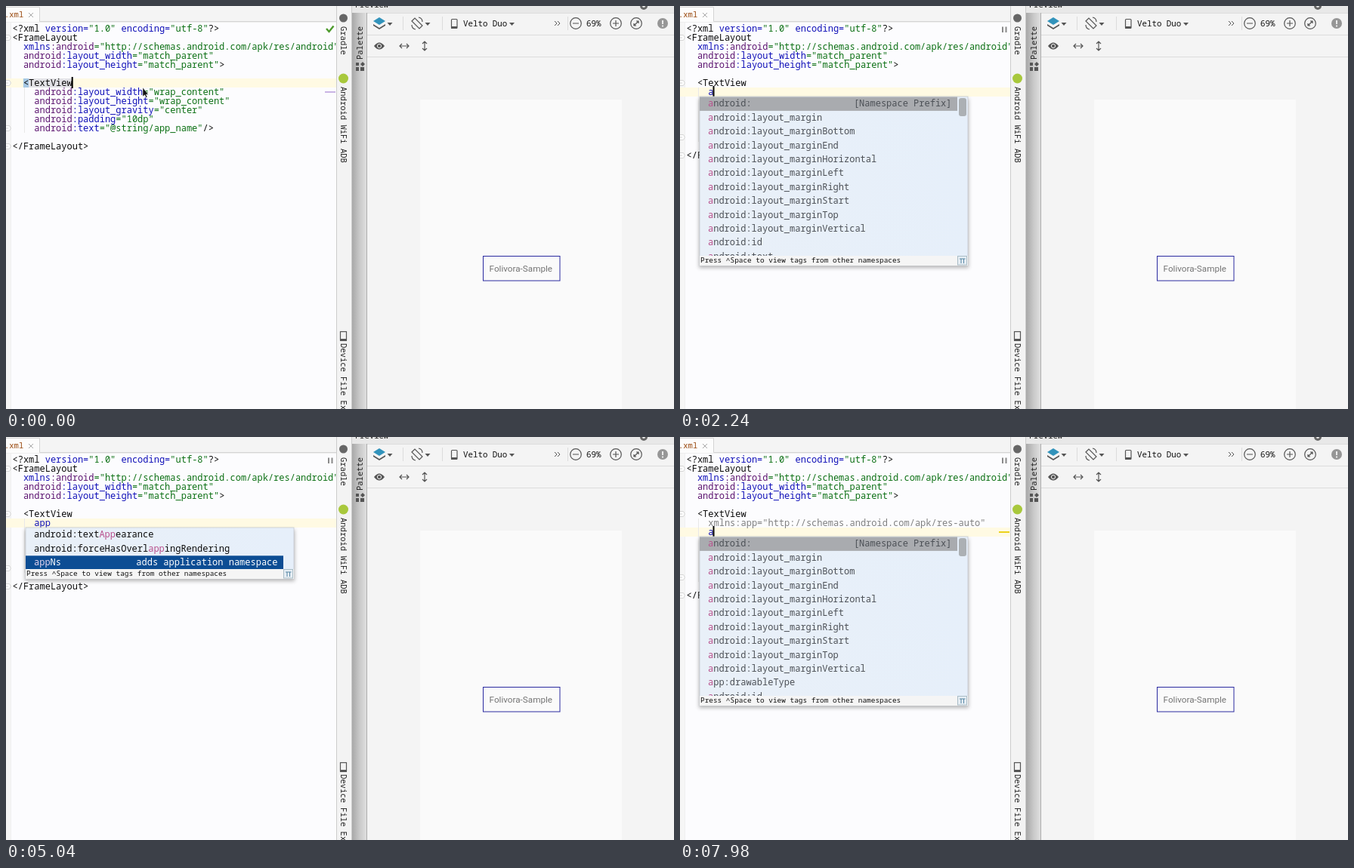
Write an HTML page that moves like this. It is 884 px wide and 534 px high and loops after 8000 ms.

```html
<!DOCTYPE html>
<html lang="en">
<head>
<meta charset="utf-8">
<title>Layout editor completion</title>
<style>
html, body { margin: 0; width: 100%; height: 100%; overflow: hidden; background: #fcfcfe; }
svg { display: block; width: 884px; height: 534px; }
text { white-space: pre; font: 500 12px "Noto Sans Mono", "DejaVu Sans Mono", monospace; }
.side { font-size: 10.5px; fill: #222; }
.tool { font-size: 10.8px; fill: #111; }
.foot { font-size: 9.42px; fill: #111; }
.line { fill: none; stroke: #555; stroke-width: 1.2; }
.rule { stroke: #dcdcdc; }
</style>
</head>
<body>
<svg viewBox="0 0 884 534" xmlns="http://www.w3.org/2000/svg">
  <defs>
    <linearGradient id="edge"><stop stop-color="#a8a8a8"/><stop offset=".5" stop-color="#c9c9c9"/><stop offset="1" stop-color="#e2e2e2"/></linearGradient>
    <linearGradient id="pop"><stop stop-color="#e9f0f8"/><stop offset="1" stop-color="#e6effa"/></linearGradient>
    <clipPath id="editClip"><path d="M0 0H437V534H0z"/></clipPath>
    <clipPath id="listClip"><rect id="listBox" x="26" width="355"/></clipPath>
    <filter id="blur" x="-10%" y="-10%" width="120%" height="125%"><feGaussianBlur stdDeviation="2.5"/></filter>
    <path id="down" d="M-3.5 -2H3.5L0 2z" fill="#555"/>
  </defs>

  <!-- editor -->
  <path d="M0 0H437V534H0z" fill="#fcfcfe"/>
  <path d="M0 22H6V534H0z" fill="#f6f6f6"/>
  <path d="M6.5 22V534" stroke="#f0f0f0"/>
  <path d="M0 0H437V21H0z" fill="#f4f4f4"/>
  <path d="M0 2H44V21H0z" fill="#fcfcfc"/>
  <path d="M0 1.5H44.5V20.5H437" fill="none" stroke="#d4d4d4"/>
  <path d="M0 21.5H437" stroke="#eeeeee"/>
  <text x="-2" y="15" style="font-size:10.5px" fill="#9a4a10">.xml</text>
  <path d="M30 9l6 6m0-6l-6 6" stroke="#a8a8a8"/>
  <g id="code" clip-path="url(#editClip)"></g>
  <path id="caret" fill="#000"/>
  <path id="mouse" d="M181 108V120L183.6 117.8 185.4 121.5 187 120.6 185.3 117.2H188.3z" fill="#111" stroke="#fff" stroke-width=".5"/>
  <g id="status"></g>
  <g id="popup"></g>

  <!-- right tool stripe -->
  <path d="M437 0H458V534H437z" fill="#f3f3f3"/>
  <path d="M437.5 0V534M457.5 0V534" stroke="#cccccc"/>
  <circle cx="446.500" cy="16" r="5.500" fill="#666"/>
  <text class="side" transform="translate(443 27) rotate(90)">Gradle</text>
  <circle cx="446.500" cy="96" r="6.500" fill="#a8c83c"/>
  <text class="side" transform="translate(443 107) rotate(90)">Android WiFi ADB</text>
  <rect class="line" x="442.500" y="431.500" width="8" height="11"/>
  <path d="M442 441H451V444H442z" fill="#555"/>
  <text class="side" transform="translate(443 447) rotate(90)">Device File Explorer</text>

  <!-- preview -->
  <path d="M458 0H478V534H458z" fill="url(#edge)"/>
  <path d="M477 0H884V534H477z" fill="#f4f4f4"/>
  <path d="M458 0H884V9H458z" fill="#e8e8e8"/>
  <path d="M477.500 9V534" stroke="#acacac"/>
  <text class="side" x="462" y="2">Preview</text>
  <circle cx="844" cy="0" r="3.500" fill="none" stroke="#666" stroke-width="3"/>
  <text class="side" transform="translate(472 71) rotate(-90)">Palette</text>
  <path d="M463 75h4v4h-4zM463 81h4v5h-4zM469 81h5v5h-5zM469 77l3-3 3 3-3 3z" fill="#555"/>
  <path class="rule" d="M478 9.500H884M478 38.500H884M478 67.500H884M525.500 14V32M577.500 14V32M743.500 14V32"/>
  <path d="M494 15l8 5-8 5-8-5z" fill="#3293bb"/>
  <path d="M486 24l8 5 8-5v2l-8 5-8-5z" fill="#555"/>
  <use href="#down" x="508" y="24"/>
  <path class="line" d="M537 20l4-4 10 10-4 4zM546 15q5 1 5 6M537 25q0 5 5 6"/>
  <use href="#down" x="558" y="24"/>
  <rect class="line" x="589.500" y="17.500" width="7.500" height="12" rx="1"/>
  <path d="M589 27H597V30H589z" fill="#555"/>
  <text class="tool" x="605" y="27">Velto Duo</text>
  <use href="#down" x="669.500" y="24"/>
  <path class="line" d="M726 20l3 3-3 3M730 20l3 3-3 3" style="stroke-width:1"/>
  <g class="line"><circle cx="754" cy="23" r="7.300"/><circle cx="807" cy="23" r="7.300"/><circle cx="834" cy="23" r="7.300"/>
    <path d="M750 23H758M803 23H811M807 19V27M831 26l6-6M831 23v3h3M834 20h3v3"/></g>
  <text class="tool" x="768" y="27">69%</text>
  <circle cx="869" cy="23" r="7" fill="#969696"/>
  <path d="M869 19V24M869 25.500V27.500" stroke="#fff" stroke-width="1.600"/>
  <path d="M487 53q7-9 14 0-7 9-14 0z" fill="#555"/>
  <circle cx="494" cy="53" r="2.600" fill="#555" stroke="#f4f4f4"/>
  <path class="line" d="M521 53H533M524 50l-3 3 3 3M530 50l3 3-3 3M554 47V59M551 50l3-3 3 3M551 56l3 3 3-3"/>
  <path d="M548 124H815V534H548z" fill="#fafafa"/>
  <rect x="631.500" y="331.500" width="101.500" height="32.500" fill="#fafafa" stroke="#2a2aa0"/>
  <text x="681.300" y="351.500" text-anchor="middle" style="font:11.7px Roboto,sans-serif" fill="#747474">Folivora-Sample</text>
</svg>
<script>
const $ = id => document.getElementById(id);
const LOOP = 8000, X0 = 8.5, CW = 7.2, LH = 12, ROW = 18.4;
const INK = "#0c0c0c", BLUE = "#1010b8", PURPLE = "#5c1470", GREEN = "#0c7014", GRAY = "#808080", PINK = "#b8508c";
const URL = "http://schemas.android.com/apk/";

// Each step keeps the values of the previous one unless it changes them.
const steps = [
  { at: 0, typed: null, auto: false, line: 6, col: 11, icon: "check", stripe: "#c9b4e4", stripeY: 114, tag: true, mouse: true, list: null, pick: 0, focus: false },
  { at: 1100, typed: "", line: 7, col: 4, icon: "eye", stripe: "#e0b4dc", mouse: false },
  { at: 2100, typed: "a", col: 5, icon: "pause", tag: false, stripe: null, list: "a" },
  { at: 2600, typed: "ap", col: 6, list: "ap" },
  { at: 3060, typed: "app", col: 7, list: "app" },
  { at: 3500, pick: 1, focus: true },
  { at: 4500, pick: 2 },
  { at: 5380, typed: null, auto: true, col: 55, list: null, icon: "eye", stripe: "#ecd21c", stripeY: 126, pick: 0, focus: false },
  { at: 6200, icon: "square", quiet: true },
  { at: 6500, typed: "", line: 8, col: 4, icon: "eye" },
  { at: 7080, icon: "square", quiet: true },
  { at: 7800, typed: "a", col: 5, icon: "pause", list: "a2" }
];
steps.forEach((s, i) => {
  if (i) steps[i] = { ...steps[i - 1], quiet: false, ...s };
  steps[i].blink = s.quiet ? steps[i - 1].blink : s.at;
});

const pre = "~a~ndroid:";
const margins = ["", "Bottom", "End", "Horizontal", "Left", "Right", "Start", "Top", "Vertical"].map(s => pre + "layout_margin" + s);
const paddings = ["Bottom", "End", "Horizontal", "Left", "Right", "Start", "Top", "Vertical"].map(s => pre + "~p~adding" + s);
const prefix = pre + "|[Namespace Prefix]";
const lists = {
  a: { rows: [prefix, ...margins, pre + "id", pre + "text"], thumb: 24 },
  ap: { rows: [pre + "autoSize~P~resetSizes", ...paddings, pre + "~p~ointerIcon", pre + "~p~rivateImeOptions", pre + "drawable~P~adding"], thumb: 74 },
  app: { rows: ["android:text~App~earance", "android:forceHasOverl~app~ingRendering", "~app~Ns|adds application namespace"] },
  a2: { rows: [prefix, ...margins, "~a~pp:drawableType", pre + "id"], thumb: 24 }
};

const esc = s => s.replace(/&/g, "&amp;").replace(/</g, "&lt;");
const span = ([fill, s]) => `<tspan fill="${fill}">${esc(s)}</tspan>`;
const rect = (x, y, w, h, fill, more = "") => `<rect x="${x}" y="${y}" width="${w}" height="${h}" fill="${fill}" ${more}/>`;
const attr = (name, value) => [[PURPLE, "android"], [BLUE, ":" + name], [GREEN, `="${value}"`]];
const colX = col => X0 + col * CW;
const lineY = line => 24 + line * LH;

function codeLines(s) {
  const lines = [
    [0, [INK, "<?xml "], [BLUE, "version="], [GREEN, '"1.0" '], [BLUE, "encoding="], [GREEN, '"utf-8"'], [INK, "?>"]],
    [0, [INK, "<FrameLayout"]],
    [2, [BLUE, "xmlns"], [PURPLE, ":android"], [GREEN, `="${URL}res/android"`]],
    [2, ...attr("layout_width", "match_parent")],
    [2, ...attr("layout_height", "match_parent"), [INK, ">"]],
    [0],
    [2, [INK, "<TextView"]]
  ];
  if (s.auto) lines.push([4, [GRAY, `xmlns:app="${URL}res-auto"`]]);
  if (s.typed !== null) lines.push([4, [BLUE, s.typed]]);
  lines.push(
    [4, ...attr("layout_width", "wrap_content")],
    [4, ...attr("layout_height", "wrap_content")],
    [4, ...attr("layout_gravity", "center")],
    [4, ...attr("padding", "10dp")],
    [4, ...attr("text", "@string/app_name"), [INK, "/>"]],
    [0],
    [0, [INK, "</FrameLayout>"]]
  );
  return lines;
}

function drawCode(s) {
  const lines = codeLines(s), last = lines.length - 1;
  let out = rect(0, lineY(s.line), 437, LH, "#fffae3");
  if (s.tag) out += rect(colX(2), 96, CW, LH, "#a6c8e4") + rect(colX(3), 96, CW * 8, LH, "#e2e2e6");
  if (s.auto && s.line === 7) out += [14, 54].map(c => rect(colX(c), 108, CW, LH, "#99ccee")).join("");
  out += `<path d="M24.500 108V${lineY(last - 1)}" stroke="#e8e8e8"/>`;
  for (const n of [1, 6, last - 2, last])
    out += `<path d="M0 ${lineY(n) + 2.5}H4.500L6.500 ${lineY(n) + 6}L4.500 ${lineY(n) + 9.5}H0M0 ${lineY(n) + 6}H3" fill="#fcfcfc" stroke="#d6d6d6"/>`;
  lines.forEach(([col, ...parts], i) => {
    out += `<text x="${colX(col)}" y="${lineY(i) + 10}">${parts.map(span).join("")}</text>`;
  });
  $("code").innerHTML = out;
}

const icons = {
  check: '<path d="M424 30l3.500 4 6-7.500" fill="none" stroke="#4c9a2c" stroke-width="2.400"/>',
  eye: '<path d="M423.500 31q5.500-8 11 0-5.500 8-11 0z" fill="none" stroke="#747474" stroke-width="1.300"/><circle cx="429" cy="31" r="2" fill="#747474"/>',
  pause: '<path d="M427 27.500V35M431.500 27.500V35" stroke="#8a8a8a" stroke-width="2"/>',
  square: rect(424.5, 26.5, 10, 10, "#e6c200", 'stroke="#cfae10"')
};

function drawStatus(s) {
  $("status").innerHTML = icons[s.icon] + (s.stripe ? rect(422, s.stripeY - 1, 14, 2, s.stripe) : "");
}

function drawPopup(s) {
  const list = lists[s.list];
  if (!list) return void ($("popup").innerHTML = "");
  const top = lineY(s.line) + 12, small = !list.thumb;
  const bodyH = small ? 55 : 211, h = bodyH + 13, foot = top + bodyH;
  $("listBox").setAttribute("y", top);
  $("listBox").setAttribute("height", bodyH);
  let rows = "";
  list.rows.forEach((row, i) => {
    const y = top + i * ROW, on = i === s.pick;
    const ink = on && s.focus ? "#fff" : small ? INK : "#4c5056";
    const [name, note] = row.split("|");
    if (on) rows += rect(26, y + .5, 341, ROW, s.focus ? "#0c4d94" : "#a9abaf");
    const parts = name.split("~").map((p, k) => span([k % 2 ? (on && s.focus ? "#e4d4ee" : PINK) : ink, p]));
    rows += `<text x="37" y="${y + 13.3}">${parts.join("")}</text>`;
    if (note) rows += `<text x="359.500" y="${y + 13.3}" text-anchor="end" fill="${ink}">${note}</text>`;
  });
  $("popup").innerHTML =
    rect(25, top + 3, 357, h, "#606060", 'opacity=".45" filter="url(#blur)"') +
    rect(26, top, 355, h, "url(#pop)", 'stroke="#c2c6ca" stroke-width=".7"') +
    `<g clip-path="url(#listClip)">${rows}</g>` +
    (small ? "" : rect(369, top + 2, 10, list.thumb, "#acb0b4", 'rx="3"')) +
    rect(26, foot, 355, 13, "#f5f5f5") +
    `<text class="foot" x="27" y="${foot + 9}">Press ^Space to view tags from other namespaces</text>` +
    rect(367.5, foot + .5, 12, 11.5, "#e6eef4", 'stroke="#a9bcc6"') +
    `<path d="M370 ${foot + 4}H377.500M372 ${foot + 4}V${foot + 10}M375.500 ${foot + 4}V${foot + 10}" fill="none" stroke="#5686a4"/>`;
}

let shown = null;
function render(t) {
  const s = steps.findLast(step => step.at <= t);
  if (s !== shown) {
    drawCode(s);
    drawStatus(s);
    drawPopup(s);
    $("mouse").style.display = s.mouse ? "" : "none";
    $("caret").setAttribute("d", `M${colX(s.col) - 1} ${lineY(s.line) - 2}h2v15h-2z`);
    shown = s;
  }
  $("caret").style.display = (t - s.blink) % 1000 < 500 ? "" : "none";
}

const start = performance.now();
function tick() {
  render((performance.now() - start) % LOOP);
  requestAnimationFrame(tick);
}
tick();
</script>
</body>
</html>
```
